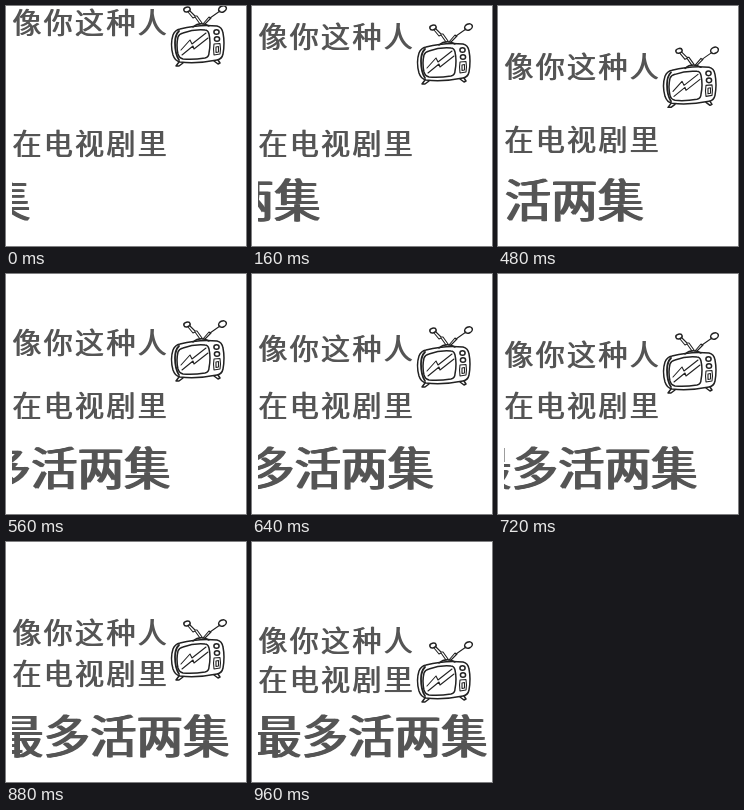
These frames come from a looping animation (240x240 px, 2960 ms). An HTML page:

```html
<!DOCTYPE html>
<html lang="zh">
<head>
<meta charset="utf-8">
<style>
html, body { margin: 0; width: 100%; height: 100%; overflow: hidden; background: #fff; }
svg { display: block; width: 100vw; height: 100vh; }
text { font-family: "Noto Sans CJK SC", "Noto Sans CJK", sans-serif; font-weight: 400; fill: #555; white-space: pre; }
.small { font-size: 29px; letter-spacing: 2.3px; }
.big { font-size: 46px; letter-spacing: 0.5px; }
#tv { fill: none; stroke: #222; stroke-width: 1.5; stroke-linecap: round; stroke-linejoin: round; }
#tv .thin { stroke-width: 1.1; }
</style>
</head>
<body>
<svg viewBox="0 0 240 240">
  <clipPath id="edge"><rect x="6" y="160" width="234" height="80"/></clipPath>
  <!-- shifted copies widen the upright strokes only -->
  <g id="top">
    <text id="line1" class="small" x="6" y="110">像你这种人</text>
    <use href="#line1" x="1"/>
  </g>
  <g id="middle">
    <text id="line2" class="small" x="6" y="149">在电视剧里</text>
    <use href="#line2" x="1"/>
  </g>
  <g clip-path="url(#edge)">
    <g id="bottom">
      <text id="line3" class="big" x="2" y="211">最多活两集</text>
      <use href="#line3" x="1.2"/>
      <use href="#line3" x="2.4"/>
    </g>
  </g>
  <g id="tv">
    <!-- case and screen -->
    <path d="M174 123 Q193 118 211 120 Q216 121 217 127 Q219 137 217 148 Q216 153 211 154 Q191 158 174 156 Q169 155 167 149 Q164 138 167 129 Q169 124 174 123Z"/>
    <path d="M173 125 Q169 129 169 137 Q169 148 173 154" stroke-width="1.8"/>
    <path d="M177 127 Q188 123 199 124 Q202 124 203 128 Q205 137 203 147 Q203 151 199 152 Q187 154 177 153 Q173 152 172 148 Q170 139 172 131 Q173 128 177 127Z"/>
    <path class="thin" d="M175 144 L184 134 L186 138 L200 127 M176 149 L187 140 L188 143 L202 132"/>
    <!-- controls -->
    <ellipse cx="210.5" cy="126" rx="2.6" ry="2.3"/>
    <ellipse cx="211" cy="133" rx="2.6" ry="2.3"/>
    <path class="thin" d="M208 138 L214 137.5 Q215 143 214 148 L208 149 Q207 143 208 138Z M210 141 L212.5 140.5 L212.5 146 L210 146.5Z"/>
    <!-- legs -->
    <path d="M173 156 L170 160 L173 160 L177 157 M208 155 L212 158 L214 157 L212 154"/>
    <!-- aerials -->
    <path d="M187 121 Q194 115 203 120"/>
    <path class="thin" d="M194 118 L189 111 L187 112 L182 106 M196 117 L191 110 L189 110 L184 105 M197 118 L203 111 L204 112 L214 105 M199 118 L205 112"/>
    <ellipse cx="181" cy="103.5" rx="3.2" ry="2.3" transform="rotate(-15 181 103.5)"/>
    <ellipse cx="216.5" cy="103" rx="4" ry="3" transform="rotate(-25 216.5 103)"/>
  </g>
</svg>
<script>
const STEP = 80, LAST = 12, LOOP = 2960;
const steps = [0, 2, 4, 7, 9, 11, 12];
const topLift = [82, 68, 53, 30, 18, 8, 0];
const middleLift = [0, 0, 0, 6, 6, 6, 0];
const tvLift = [100, 82, 70, 53, 41, 22, 0];
const slide = [211, 167, 126, 71, 36, 12, 0];
const byId = id => document.getElementById(id);

function at(values, k) {
  let i = 0;
  while (i < steps.length - 2 && k > steps[i + 1]) i++;
  const p = (k - steps[i]) / (steps[i + 1] - steps[i]);
  return values[i] + (values[i + 1] - values[i]) * p;
}

function move(id, x, y) {
  byId(id).setAttribute("transform", `translate(${x} ${y})`);
}

function draw(now) {
  const k = Math.min(LAST, Math.floor((now % LOOP) / STEP));
  move("top", 0, -at(topLift, k));
  move("middle", 0, -at(middleLift, k));
  move("tv", 0, -at(tvLift, k));
  move("bottom", -at(slide, k), 0);
}

let start;
function tick(now) {
  start ??= now;
  draw(now - start);
  requestAnimationFrame(tick);
}
draw(0);
requestAnimationFrame(tick);
</script>
</body>
</html>
```
